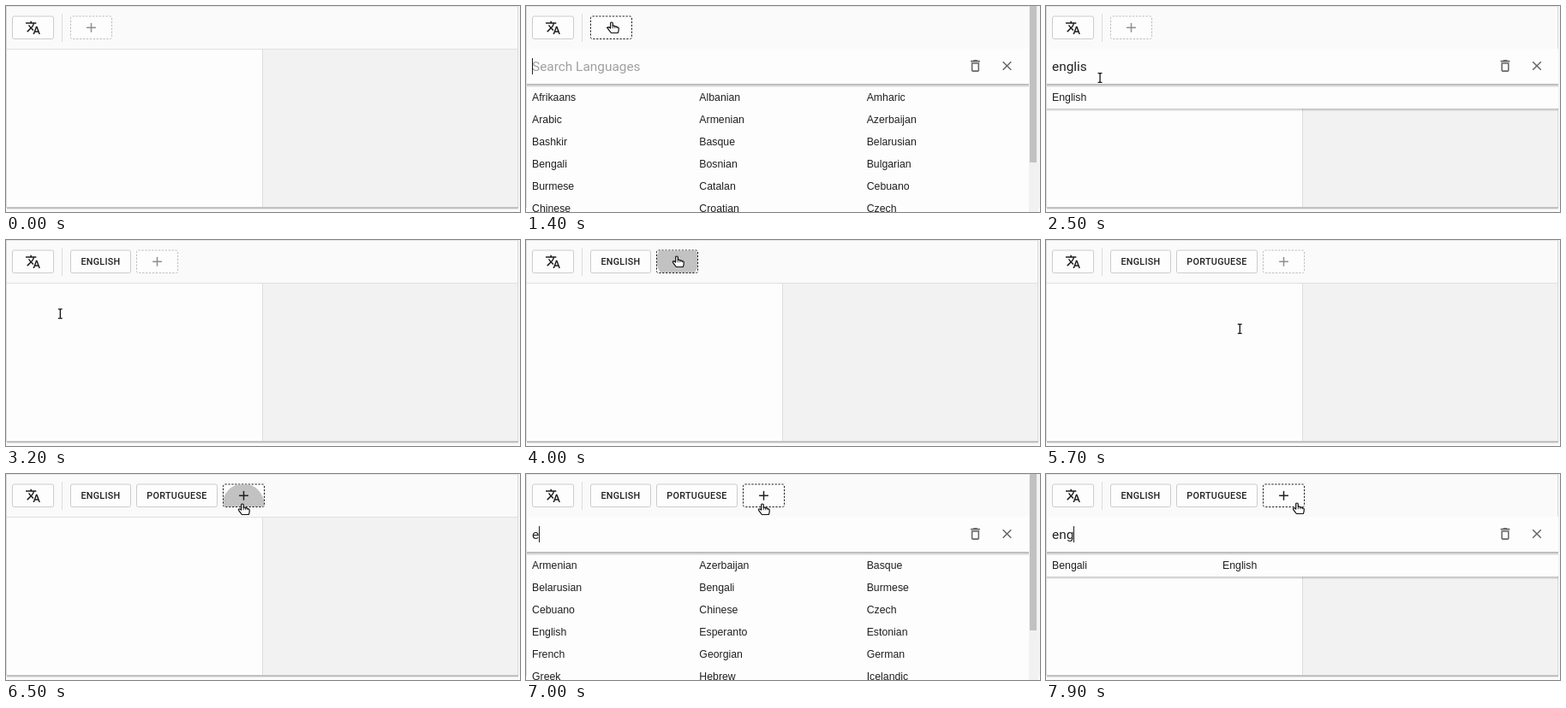
Write an HTML page with a canvas that moves like this. It is 600 px wide and 241 px high and loops after 8000 ms.

```html
<!DOCTYPE html>
<html lang="en">
<head>
<meta charset="utf-8">
<title>Language picker</title>
<style>
html, body { margin: 0; width: 100%; height: 100%; overflow: hidden; background: #fafafa; }
canvas { display: block; }
</style>
</head>
<body>
<canvas id="stage" width="600" height="241"></canvas>
<script>
const ctx = document.getElementById('stage').getContext('2d');
const W = 600, H = 241, LOOP = 8000, STEP = 100;
const ICON_SCALE = 0.767;

const LANGUAGES = `Afrikaans Albanian Amharic Arabic Armenian Azerbaijan Bashkir Basque Belarusian
Bengali Bosnian Bulgarian Burmese Catalan Cebuano Chinese Croatian Czech Danish Dutch English
Esperanto Estonian Finnish French Galician Georgian German Greek Gujarati Hebrew Hindi Hungarian
Icelandic Irish Italian Japanese Kannada Kazakh Korean Latin Latvian Nepali Polish Portuguese
Punjabi Romanian Russian Slovenian Spanish Swedish Turkish Ukrainian Welsh`.split(/\s+/);

const TRANSLATE = new Path2D('M12.87 15.07l-2.54-2.51.03-.03c1.74-1.94 2.98-4.17 3.71-6.53H17V4h-7V2H8v2H1v1.99h11.17C11.5 7.92 10.44 9.75 9 11.35 8.07 10.32 7.3 9.19 6.69 8h-2c.73 1.63 1.73 3.17 2.98 4.56l-5.09 5.02L4 19l5-5 3.11 3.11.76-2.04zM18.5 10h-2L12 22h2l1.12-3h4.75L21 22h2l-4.5-12zm-2.62 7l1.62-4.33L19.12 17h-3.24z');
const TRASH = new Path2D('M6 19c0 1.1.9 2 2 2h8c1.1 0 2-.9 2-2V7H6v12zM8 9h8v10H8V9zm7.5-5l-1-1h-5l-1 1H5v2h14V4z');
const HAND = new Path2D('M-1.3 7V1.1Q-1.3 0 0 0T1.3 1.1V4.4Q3.3 3.6 3.8 5Q5.6 4.4 6.2 5.8Q8.2 5.4 8.2 7.2V9Q8.2 10.6 7.2 12.5H-.6Q-2.2 10.4-4.3 7.6Q-5 6.3-3.8 5.8Q-2.6 5.6-1.3 7Z');
const ARROW = new Path2D('M0 0V12L2.8 9.4L4.7 13.6L6.6 12.8L4.8 8.7H8.6Z');

// Each session: the add button is pressed, the search opens, a word is typed.
const sessions = [
  { click: 1300, open: 1400, close: 2900, word: 'englis', keys: [1550, 1650, 1750, 1850, 1900, 1980], picked: 'ENGLISH' },
  { click: 4000, open: 4100, close: 5600, word: 'po', keys: [4400, 4500], picked: 'PORTUGUESE' },
  { click: 6500, open: 6600, close: LOOP, word: 'eng', keys: [7000, 7200, 7500] }
];

// Pointer stops: time, x, y
const pointerPath = [
  [200, 388, 14], [300, 230, 18], [400, 108, 26], [600, 108, 26], [1100, 100, 19],
  [1700, 100, 19], [2500, 63, 84], [2800, 44, 104], [2900, 44, 104], [3000, 47, 96],
  [3900, 176, 19], [4800, 176, 19], [5100, 224, 132], [5300, 224, 107], [5600, 224, 107],
  [6400, 276, 35], [7200, 276, 35], [7700, 293, 34], [LOOP, 293, 34]
];

function pointerAt(t) {
  if (t < pointerPath[0][0]) return null;
  const i = Math.max(1, pointerPath.findIndex(p => p[0] >= t));
  const [t0, x0, y0] = pointerPath[i - 1], [t1, x1, y1] = pointerPath[i];
  const u = (t - t0) / (t1 - t0), k = u * u * (3 - 2 * u);
  return { x: x0 + (x1 - x0) * k, y: y0 + (y1 - y0) * k };
}

function rect(x, y, w, h, color) {
  ctx.fillStyle = color;
  ctx.fillRect(x, y, w, h);
}

function text(str, x, y, font, color, spacing = 0) {
  ctx.font = font;
  ctx.letterSpacing = spacing + 'px';
  ctx.fillStyle = color;
  ctx.fillText(str, x, y);
}

function icon(path, cx, cy, color) {
  ctx.save();
  ctx.translate(cx, cy);
  ctx.scale(ICON_SCALE, ICON_SCALE);
  ctx.translate(-12, -12);
  ctx.fillStyle = color;
  ctx.fill(path);
  ctx.restore();
}

function cross(cx, cy, r, color, angle = 0) {
  ctx.save();
  ctx.translate(cx, cy);
  ctx.rotate(angle);
  rect(-r, -0.75, 2 * r, 1.5, color);
  rect(-0.75, -r, 1.5, 2 * r, color);
  ctx.restore();
}

function button(x, w, border, dash = []) {
  ctx.beginPath();
  ctx.roundRect(x + 0.5, 12, w - 1, 26.5, 2);
  ctx.fillStyle = '#fdfdfd';
  ctx.fill();
  ctx.lineWidth = 1;
  ctx.strokeStyle = border;
  ctx.setLineDash(dash);
  ctx.stroke();
  ctx.setLineDash([]);
}

function shadow(y, right, size, strength) {
  for (let i = 0; i < size; i++) {
    rect(1, y + i, right - 1, 1, `rgba(0,0,0,${strength * (1 - i / size)})`);
  }
}

function drawPage(right) {
  rect(0, 0, W, H, '#fafafa');
  rect(1, 50, 298, 185, '#fdfdfd');
  rect(299, 50, right - 299, 185, '#f2f2f2');
  rect(299, 50, 1, 185, '#dedede');
  rect(0, 50, right, 1, '#e0e0e0');
  rect(0, 0, W, 1, '#e4e4e4');
  rect(0, 0, 1, 236, '#dcdcdc');
  rect(597, 0, 1, 236, '#dcdcdc');
  rect(598, 0, 2, 236, '#f4f4f4');
  rect(1, 235, 597, 1, '#c6c6c6');
  rect(1, 236, 597, 1, '#bdbdbd');
  rect(1, 237, 597, 1, '#e6e6e6');
}

function drawToolbar(t, pointer) {
  button(7, 49, '#cccccc');
  icon(TRANSLATE, 31.5, 25.3, '#1c1c1c');
  rect(65, 9, 1, 33, '#dcdcdc');

  let x = 75;
  for (const s of sessions) {
    if (!s.picked || t < s.close) continue;
    const w = s.picked === 'ENGLISH' ? 71 : 95;
    button(x, w, '#cccccc');
    ctx.textAlign = 'center';
    text(s.picked, x + w / 2, 29, '500 10.75px Roboto, sans-serif', '#202020', 0.3);
    ctx.textAlign = 'left';
    x += w + 6;
  }

  const hover = pointer && pointer.x >= x && pointer.x <= x + 49 && pointer.y >= 11 && pointer.y <= 39;
  button(x, 49, hover ? '#202020' : '#bcbcbc', [2.3, 1.6]);
  const pressed = sessions.some(s => t >= s.click && t < s.open);
  if (pressed) {
    ctx.save();
    ctx.beginPath();
    ctx.rect(x + 1, 12.5, 47, 25.5);
    ctx.clip();
    ctx.beginPath();
    ctx.arc(pointer.x + 1, pointer.y + (pointer.y < 30 ? 5 : 1), 24.5, 0, 7);
    ctx.fillStyle = '#c2c2c2';
    ctx.fill();
    ctx.restore();
    button.call;
    ctx.strokeStyle = '#202020';
  }
  cross(x + 24.5, 25.3, 5.4, hover ? '#202020' : '#8e8e8e');
  return hover || (pointer && pointer.y >= 11 && pointer.y <= 39 && pointer.x >= 75 && pointer.x < x);
}

function drawPanel(t, s, query, items, bottom, scroll) {
  const right = scroll ? 587 : 598;
  const offset = scroll ? 11.5 : 0;
  const col = (right - 1) / 3;

  rect(1, 50, right - 1, bottom - 50, '#fdfdfd');
  shadow(bottom, right, 3, 0.2);
  shadow(91, right, 4, 0.28);

  const font = '15.4px Roboto, sans-serif';
  text(query || 'Search Languages', 7, 76, font, query ? '#202020' : '#a0a0a0');
  const typed = query ? s.keys[query.length - 1] : s.open;
  if ((t - typed) % 1000 < 500) {
    const caret = 7 + (query ? ctx.measureText(query).width : 0);
    rect(Math.round(caret), 61, 1, 19, '#202020');
  }
  icon(TRASH, 536 - offset, 70, '#666666');
  cross(573 - offset, 70, 6.8, '#666666', Math.PI / 4);

  items.forEach((name, i) => {
    const y = 110.5 + Math.floor(i / 3) * 26.1;
    if (y < H + 12) text(name, 7 + (i % 3) * col, y, '12.3px "Liberation Sans", Arial, sans-serif', '#202020');
  });

  if (scroll) {
    rect(587, 0, 11, H, '#f1f1f1');
    rect(588, 0, 8, 183, '#c1c1c1');
  }
}

function drawPointer({ x, y }, kind) {
  ctx.save();
  ctx.translate(x, y);
  if (kind === 'text') {
    rect(-3.5, -7, 7, 3, '#fff');
    rect(-3.5, 4, 7, 3, '#fff');
    rect(-1.5, -6, 3, 12, '#fff');
    rect(-0.6, -5.5, 1.3, 11, '#111');
    rect(-2.5, -6, 5, 1.2, '#111');
    rect(-2.5, 4.8, 5, 1.2, '#111');
  } else {
    const shape = kind === 'hand' ? HAND : ARROW;
    ctx.fillStyle = kind === 'hand' ? '#fff' : '#111';
    ctx.strokeStyle = kind === 'hand' ? '#111' : '#fff';
    ctx.lineWidth = 1.2;
    ctx.lineJoin = 'round';
    ctx.fill(shape);
    ctx.stroke(shape);
    if (kind === 'hand') {
      for (const dx of [1.3, 3.8, 6.2]) rect(dx - 0.4, 5, 0.8, 2.2, '#111');
    }
  }
  ctx.restore();
}

function draw(t) {
  const pointer = pointerAt(t);
  const s = sessions.find(o => t >= o.open && t < o.close);
  const query = s ? s.word.slice(0, s.keys.filter(k => k <= t).length) : '';
  const items = LANGUAGES.filter(n => n.toLowerCase().includes(query));
  const bottom = s ? 120 + (Math.ceil(items.length / 3) - 1) * 26.1 : 50;
  const scroll = bottom > H;

  drawPage(scroll ? 587 : 598);
  const overButton = drawToolbar(t, pointer);
  if (s) drawPanel(t, s, query, items, Math.min(Math.round(bottom), 319), scroll);

  if (pointer) {
    const overItem = s && pointer.y > 92 && pointer.y < bottom;
    const kind = overButton || overItem ? 'hand' : pointer.y > 50 ? 'text' : 'arrow';
    drawPointer(pointer, kind);
  }
}

const start = performance.now();
function tick() {
  const t = (performance.now() - start) % LOOP;
  draw(Math.floor(t / STEP) * STEP);
  requestAnimationFrame(tick);
}
tick();
</script>
</body>
</html>
```
